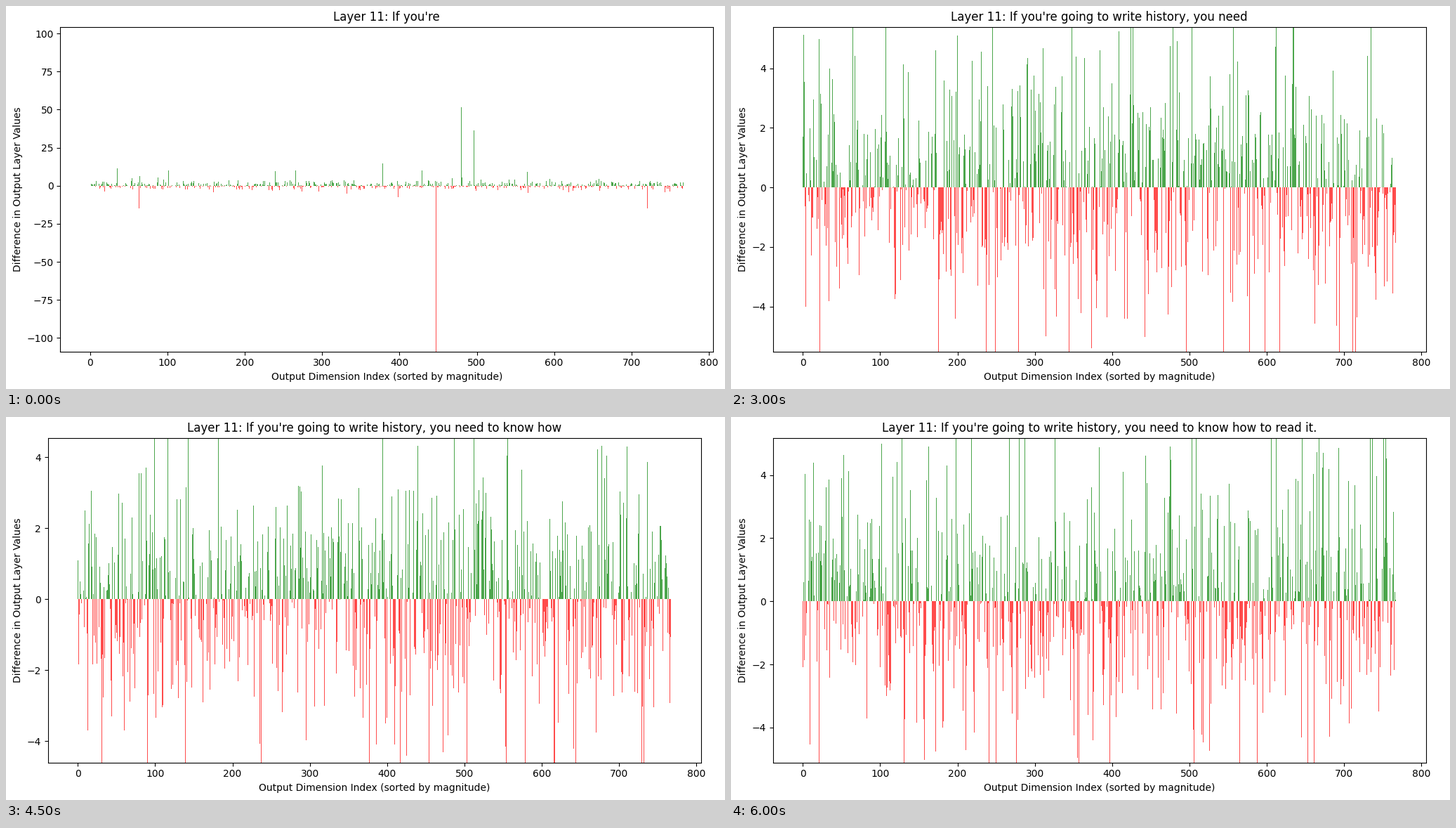
Write a matplotlib script that moves like this. It is 1024 by 545 pixels and loops after 6.5 s.

```python
import numpy as np
import matplotlib.pyplot as plt
from matplotlib.animation import FuncAnimation

W, H, DPI = 1024, 545, 100
AX_W, AX_H = 930, 462
MARGIN = 10
COUNT = 768
WORDS = "If you're going to write history, you need to know how to read it.".split()
STEPS = len(WORDS) - 1

# vertical range of the chart at each step
TOPS = [104.3, 52.1, 26.5, 13.9, 8.56, 6.7, 5.39, 5.1, 4.8, 4.55, 4.32, 4.75, 5.18]
LOWS = [-108.9, -54.4, -27.66, -14.4, -8.93, -6.85, -5.51, -5.15, -4.83, -4.6,
        -4.34, -4.7, -5.11]

# strong dimensions: value at steps 0, 2 and 4, blended in between
STRONG = {
    138: (-150, -60, -20),
    447: (-150, -60, -20),
    496: (36.5, 24.9, 10),
    480: (51.5, 2, -2),
    378: (14.5, 2, 1),
    63: (-15, 1, 1),
    721: (-15, 5.7, 1),
    35: (11.5, 1, 1),
    101: (10, -6.6, 2),
    266: (10, 1, 2),
    429: (10, 7.2, 1),
    565: (9, 1, -5),
    49: (1, 10.5, 2),
    139: (1, 8.8, 3),
    314: (2, -14, -10),
    373: (1, -15.9, 4),
    709: (1, 3.8, -10),
}


def bar_values(n):
    # heavy-tailed noise, so a few bars run off the chart
    rng = np.random.default_rng(100 + n)
    values = rng.standard_t(6, COUNT) * min(1.4 + 0.1 * n, 0.37 * TOPS[n])
    if n <= 4:
        for dim, keys in STRONG.items():
            values[dim] = np.interp(n, (0, 2, 4), keys)
    return values


VALUES = [bar_values(n) for n in range(STEPS)]

plt.rcParams["font.family"] = "DejaVu Sans"
fig = plt.figure(figsize=(W / DPI, H / DPI), dpi=DPI)
ax = fig.add_axes([0, 0, 1, 1])
bars = ax.bar(range(COUNT), np.ones(COUNT), width=0.8, alpha=0.7)
ax.set_xlim(-38.79, 805.79)
ax.set_xlabel("Output Dimension Index (sorted by magnitude)")
ax.set_ylabel("Difference in Output Layer Values")


def place(x, y):
    ax.set_position([x / W, y / H, AX_W / W, AX_H / H])


def fit_margin():
    """Move the axes so that the labels start at the left and bottom margin."""
    place(150, 66)
    outer = ax.get_tightbbox()
    place(MARGIN + 150 - outer.x0, MARGIN + 66 - outer.y0)


def draw(n):
    ax.set_ylim(LOWS[n], TOPS[n])
    ax.set_title("Layer 11: " + " ".join(WORDS[:n + 2]))
    for bar, y in zip(bars, VALUES[n]):
        bar.set_height(y)
        bar.set_facecolor("green" if y > 0 else "red")
    fit_margin()
    return []


anim = FuncAnimation(fig, draw, frames=STEPS, init_func=lambda: draw(0),
                     interval=500, repeat=True, repeat_delay=0, blit=False)
plt.show()
```
